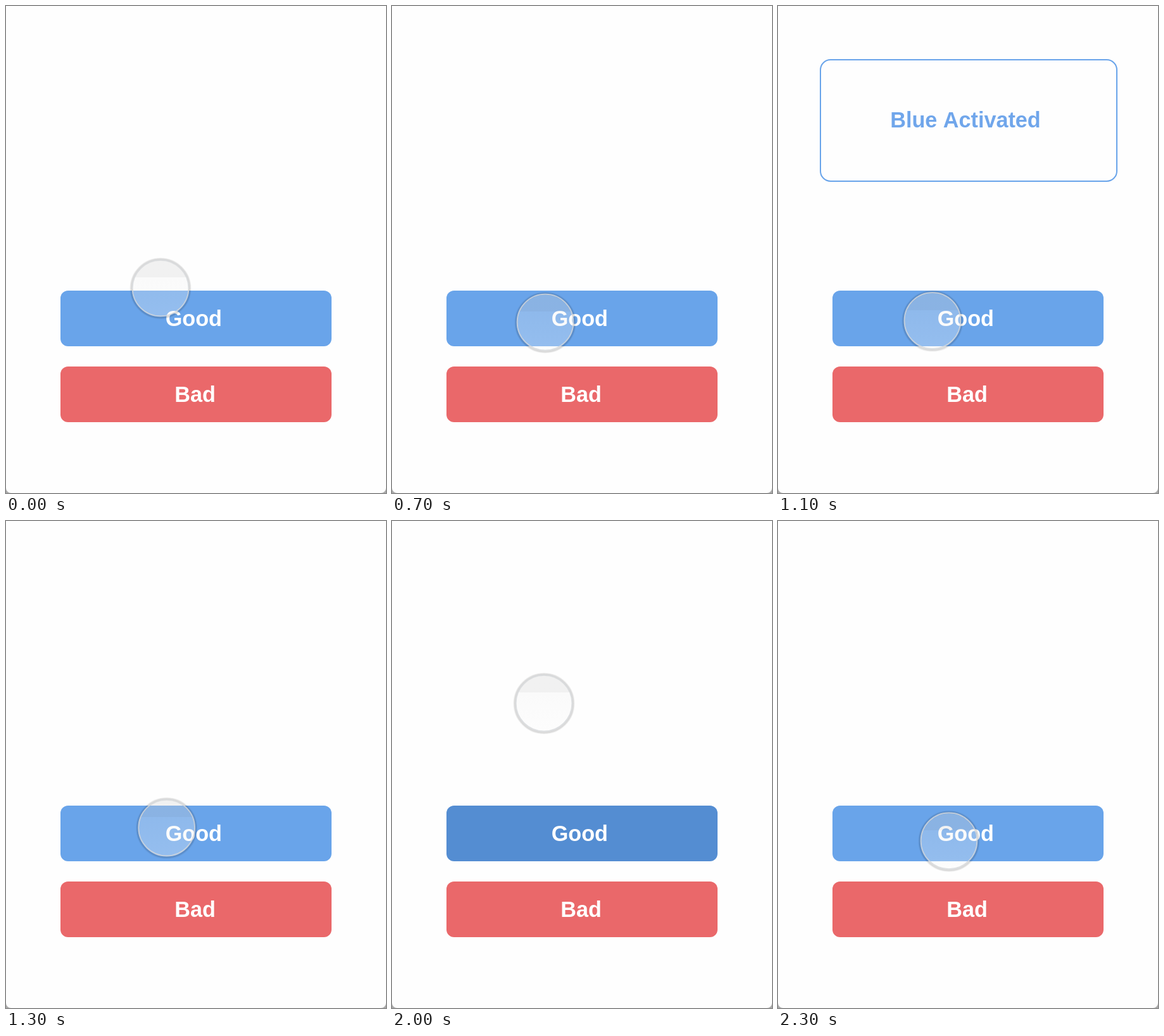
Write an HTML page with a canvas that moves like this. It is 600x770 px and loops after 2.4 s.

```html
<!DOCTYPE html>
<html lang="en">
<head>
<meta charset="utf-8">
<title>Good or bad</title>
<style>
html, body { margin: 0; width: 100%; height: 100%; overflow: hidden; }
canvas { display: block; }
</style>
</head>
<body>
<canvas id="stage" width="600" height="770"></canvas>
<script>
const ctx = document.getElementById('stage').getContext('2d');
const LOOP = 2400, STEP = 100;
const BLUE = '#69a4ea', HELD_BLUE = '#548dd2', TAPPED_BLUE = '#5c8cc4', RED = '#ea686a';

// Where the pointer turns or rests
const stops = [
  { at: 0, x: 244, y: 446 },
  { at: 350, x: 270, y: 557 },
  { at: 700, x: 242, y: 500 },
  { at: 1000, x: 242, y: 500 },
  { at: 1500, x: 260, y: 477 },
  { at: 1600, x: 260, y: 477 },
  { at: 2000, x: 240, y: 288 },
  { at: LOOP, x: 275.5, y: 546 }
];

const during = (t, from, to) => t >= from && t < to;
const ease = k => k * k * (3 - 2 * k);

function pointerAt(t) {
  const i = stops.findIndex(s => s.at > t);
  const a = stops[i - 1], b = stops[i];
  const k = ease((t - a.at) / (b.at - a.at));
  return [a.x + (b.x - a.x) * k, a.y + (b.y - a.y) * k];
}

function box(x, y, w, h, r) {
  ctx.beginPath();
  ctx.roundRect(x, y, w, h, r);
}

function label(text, x, y, color) {
  ctx.font = 'bold 34.2px "Liberation Sans", Arial, sans-serif';
  ctx.textAlign = 'center';
  ctx.fillStyle = color;
  ctx.fillText(text, x, y);
}

function button(text, x, y, color) {
  ctx.fillStyle = color;
  box(86, y, 428, 88, 12);
  ctx.fill();
  label(text, x, y + 56, '#fff');
}

function circle(x, y, r) {
  ctx.beginPath();
  ctx.arc(x, y, r, 0, 2 * Math.PI);
}

function ring(x, y, r, width, color) {
  circle(x, y, r);
  ctx.lineWidth = width;
  ctx.strokeStyle = color;
  ctx.stroke();
}

function glass(y, r) {
  const fill = ctx.createLinearGradient(0, y - r, 0, y + r);
  fill.addColorStop(0, 'rgba(212,212,212,.31)');
  fill.addColorStop(.31, 'rgba(212,212,212,.31)');
  fill.addColorStop(.31, 'rgba(240,240,240,.28)');
  fill.addColorStop(1, 'rgba(250,250,250,.3)');
  return fill;
}

function pointer(x, y, held) {
  const r = held ? 42 : 44.4;
  circle(x, y, r);
  ctx.fillStyle = held ? 'rgba(236,236,236,.53)' : glass(y, r);
  ctx.fill();
  for (const width of [2, 3.5, 5]) ring(x, y + .5, r + 1.6, width, 'rgba(0,0,0,.05)');
  ring(x, y, r, 1.8, 'rgba(217,219,222,.8)');
}

function draw(now) {
  const t = Math.floor(now % LOOP / STEP) * STEP;
  const tapped = during(t, 800, 1000), pressed = during(t, 1500, 2100);

  ctx.fillStyle = '#aaa';
  ctx.fillRect(0, 0, 600, 770);
  ctx.fillStyle = '#fefefe';
  box(0, 0, 600, 770, [0, 0, 8, 8]);
  ctx.fill();

  if (during(t, 900, 1300)) {
    ctx.lineWidth = 2;
    ctx.strokeStyle = BLUE;
    box(67, 85, 468, 192, 16);
    ctx.stroke();
    label('Blue Activated', 296, 192, '#70a6eb');
  }
  button('Good', 296.3, 450, tapped ? TAPPED_BLUE : pressed ? HELD_BLUE : BLUE);
  button('Bad', 298.5, 570, RED);
  pointer(...pointerAt(t), during(t, 1500, 2000));
}

const start = performance.now();
function tick() {
  draw(performance.now() - start);
  requestAnimationFrame(tick);
}
tick();
</script>
</body>
</html>
```
